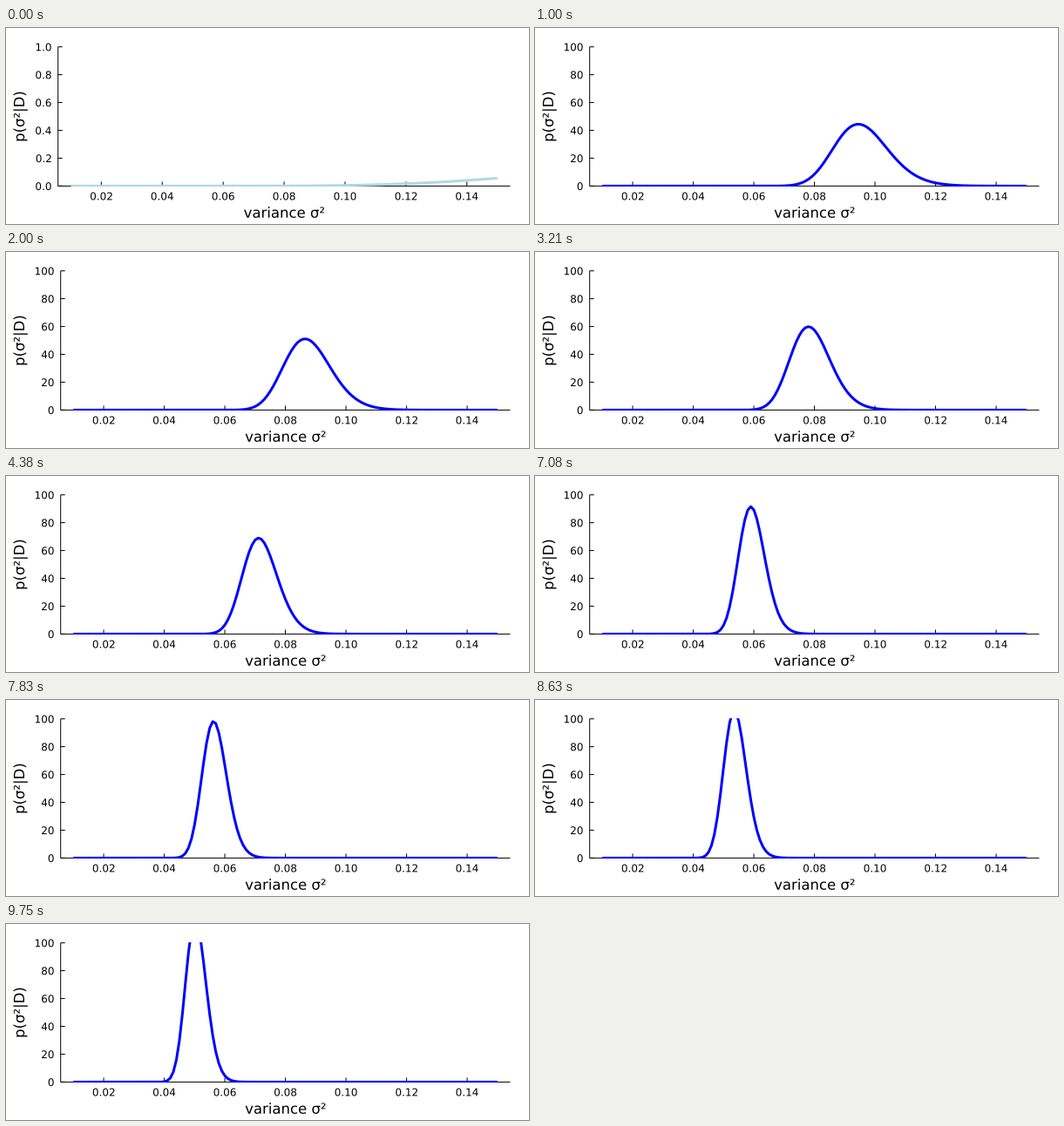
These frames come from a looping animation (600 px wide and 225 px high, 9790 ms). A matplotlib script:

```python
import math

import matplotlib.pyplot as plt
import numpy as np
from matplotlib.animation import FuncAnimation
from matplotlib.patches import PathPatch
from matplotlib.textpath import TextPath
from matplotlib.transforms import Affine2D, Bbox, TransformedBbox

W, H, DPI = 600, 225, 100
LOOP_MS, FRAMES = 9790, 235
TOP, BOTTOM, RIGHT = 21.65, 181.4, 578.4
CLIP_TOP, CLIP_BOTTOM = 21, 182
TICK = 5
PX = 72 / DPI  # points per pixel

plt.rcParams["font.family"] = "DejaVu Sans"

fig = plt.figure(figsize=(W / DPI, H / DPI), dpi=DPI, facecolor="white")
# Pixel coordinates with the origin in the top left corner
pixels = Affine2D().scale(1 / W, -1 / H).translate(0, 1) + fig.transFigure

variance = np.linspace(0.01, 0.15, 141)
X_MIN, X_MAX = 0.0058, 0.1542


def inverse_gamma(x, shape, scale):
    log_pdf = (shape * math.log(scale) - math.lgamma(shape)
               - (shape + 1) * np.log(x) - scale / x)
    return np.exp(log_pdf)


def make_panel(left, y_max, y_format, color):
    """Axes drawn in pixel coordinates; returns the axes and their curve."""
    ax = fig.add_axes([left / W, 1 - BOTTOM / H,
                       (RIGHT - left) / W, (BOTTOM - TOP) / H])
    ax.set(xlim=(X_MIN, X_MAX), ylim=(0, y_max))
    ax.axis("off")

    def stroke(xs, ys):
        ax.plot(xs, ys, color="black", lw=PX, transform=pixels, snap=False,
                clip_on=False, scalex=False, scaley=False,
                solid_capstyle="butt")

    def label(x, y, text, size, align=0.5, rotation=0):
        """Outline text; align is the share of its width left of x."""
        path = TextPath((0, 0), text, size=size)
        box = path.get_extents()
        place = (Affine2D().translate(-box.x0 - align * box.width, 0)
                 .scale(1, -1).rotate_deg(-rotation).translate(x, y))
        ax.add_artist(PathPatch(path, fc="black", lw=0, snap=False,
                                transform=place + pixels, clip_on=False))

    stroke([left, left], [TOP, BOTTOM])
    stroke([left, RIGHT], [BOTTOM, BOTTOM])
    for v in np.arange(0.02, 0.15, 0.02):
        x = left + (RIGHT - left) * (v - X_MIN) / (X_MAX - X_MIN)
        stroke([x, x], [BOTTOM, BOTTOM - TICK])
        label(x, 197.4, f"{v:.2f}", 12)
    for v in np.linspace(0, y_max, 6):
        y = BOTTOM - (BOTTOM - TOP) * v / y_max
        stroke([left, left + TICK], [y, y])
        label(left - 8, y + 4.6, format(v, y_format), 12, align=1)
    label((left + RIGHT) / 2, 217.7, "variance σ²", 16.5)
    label(21, (TOP + BOTTOM) / 2, "p(σ²|D)", 16.5, rotation=90)

    curve, = ax.plot(variance, np.zeros_like(variance), color=color,
                     lw=3 * PX, zorder=3, snap=False,
                     solid_joinstyle="round", solid_capstyle="butt")
    clip = Bbox([[left / W, 1 - CLIP_BOTTOM / H], [RIGHT / W, 1 - CLIP_TOP / H]])
    curve.set_clip_box(TransformedBbox(clip, fig.transFigure))
    return ax, curve


prior_ax, prior_curve = make_panel(59.7, 1, ".1f", "lightblue")
post_ax, post_curve = make_panel(62.7, 100, ".0f", "blue")
prior_curve.set_ydata(inverse_gamma(variance, 1, 1))


def update(i):
    prior_ax.set_visible(i == 0)
    post_ax.set_visible(i > 0)
    # Each observation adds one half to the shape; the scale levels off
    shape = 100 + i / 2
    scale = 10.95 - 0.53 * math.exp(-i / 36)
    post_curve.set_ydata(inverse_gamma(variance, shape, scale))
    return prior_curve, post_curve


anim = FuncAnimation(fig, update, frames=FRAMES, interval=LOOP_MS / FRAMES,
                     repeat=True, repeat_delay=0, blit=False)
plt.show()
```
